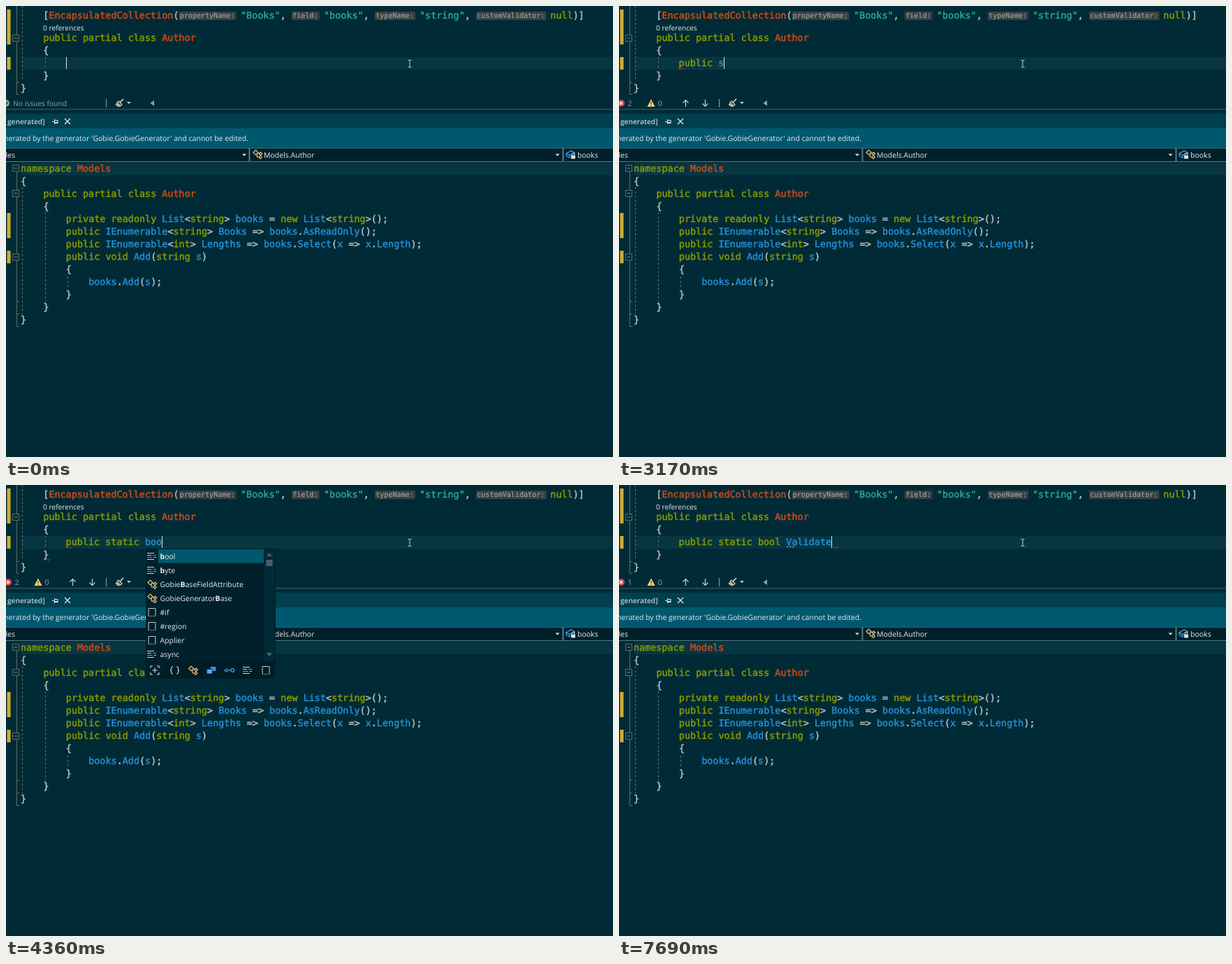
Recreate the animation shown at these times as an HTML page. Size 869 px wide and 645 px high, loop 8 s.

```html
<!DOCTYPE html>
<html lang="en">
<head>
<meta charset="utf-8">
<title>Code editor</title>
<style>
html, body { margin: 0; width: 100%; height: 100%; overflow: hidden; background: #002b36; }
svg { display: block; }
text { white-space: pre; text-rendering: geometricPrecision; }
.code { font: 13.45px "DejaVu Sans Mono", monospace; stroke-width: .5px; }
.code tspan { fill: currentColor; stroke: currentColor; }
.hint { font: 10.1px "DejaVu Sans Mono", monospace; fill: #99a09b; stroke: #99a09b; stroke-width: .2px; }
.ui { font: 10.5px "Open Sans", "Noto Sans", sans-serif; fill: #e6eced; }
.small { font-size: 10.2px; }
.muted { fill: #93a1a1; }
.tab { font-size: 10.2px; font-weight: 600; fill: #c3d0d2; }
.bold { font-weight: 700; }
</style>
</head>
<body>
<svg width="869" height="645" viewBox="0 0 869 645">
  <g id="base"></g>
  <g id="live"></g>
</svg>
<script>
const CH = 8.1, LEFT = 85.6, ROW = 81, LOOP = 8000;
const GREEN = '#859900', BLUE = '#268bd2', ORANGE = '#cb4b16', TEAL = '#2aa198', GREY = '#b3bec0';
const KEYWORDS = /^(namespace|public|private|partial|class|readonly|new|void|static|bool|string|int|null)$/;
const NAMES = /^(Author|Models|EncapsulatedCollection)$/;

const esc = s => s.replace(/&/g, '&amp;').replace(/</g, '&lt;').replace(/>/g, '&gt;');
const rect = (x, y, w, h, fill, extra = '') =>
  `<rect x="${x}" y="${y}" width="${w}" height="${h}" fill="${fill}" ${extra}/>`;
const path = (d, stroke, w = 1, extra = '') =>
  `<path d="${d}" fill="none" stroke="${stroke}" stroke-width="${w}" ${extra}/>`;
const shape = (d, fill) => `<path d="${d}" fill="${fill}"/>`;
const at = (x, y, body) => `<g transform="translate(${x} ${y})">${body}</g>`;
const ui = (x, y, s, cls = '', anchor = 'start') =>
  `<text class="ui ${cls}" x="${x}" y="${y + 3.6}" text-anchor="${anchor}">${esc(s)}</text>`;

function tint(word) {
  if (word[0] === '"') return TEAL;
  if (KEYWORDS.test(word)) return GREEN;
  if (NAMES.test(word)) return ORANGE;
  return /\w/.test(word) ? BLUE : GREY;
}

// One line of code, coloured by token, centred on y.
function code(x, y, line) {
  const spans = line.match(/"[^"]*"|\w+|[^\w"]+/g) || [];
  return `<text class="code" x="${x}" y="${y + 5}">` +
    spans.map(s => `<tspan style="color:${tint(s)}">${esc(s)}</tspan>`).join('') + '</text>';
}

const hint = (x, w, s) => rect(x, 8, w, 12, '#39413f', 'rx="1"') +
  `<text class="hint" x="${x + 1.2}" y="17.4">${s}</text>`;
const guide = (x, y1, y2) => path(`M${x + .5} ${y1}V${y2}`, '#5f706d', 1, 'stroke-dasharray="3 3"');
const fold = y => rect(9.5, y - 4.5, 9, 9, '#002b36', 'stroke="#5d6b68"') + path(`M11.5 ${y}h5`, '#7c8a88');
const mark = (y, h) => rect(1.5, y, 5, h, '#cfae33');
const squiggle = (x, y) => path(`M${x} ${y}l2 2l2.5 -2l2.5 2l2 -2`, '#c03c37', .9);
const band = y => rect(22, y, 847, 18, '#073642');
const arrowDown = (x, y, fill = '#d5dfe0') => shape(`M${x - 3} ${y - 1.5}h6l-3 3.2z`, fill);

// Icons are drawn around their own centre.
const icons = {
  keyword: c => path('M-7 -4.5H3M-7 4.5H3M-7 -1.5H-1M3 1.5H6', c || '#d2dadb') +
    path('M1 -1.5H6M-7 1.5H1', c || '#4aa3f0'),
  type: c => path('M-6 -2.5L-2.5 -6L1 -2.5L-2.5 1zM0 -1.5H4.5M-.5 0V4H2M4.5 -3l2.2 2.2l-2.2 2.2l-2.2 -2.2zM4 2l2.2 2.2l-2.2 2.2l-2.2 -2.2z', c || '#e8c27a', 1.2),
  snippet: c => path('M-5 5V-5.5H5V5', c || '#c3cccd') +
    path('M-5 5.5H5', c || '#c3cccd', 1, 'stroke-dasharray="1.5 1.5"'),
  expand: () => path('M-6 -3V-6H-3M3 -6H6V-3M6 3V6H3M-3 6H-6V3M0 -3.5V3.5M-3.5 0H3.5', '#d8dfe0', 1.1),
  braces: c => path('M-2.5 -5h-1q-1.3 0 -1.3 1.6v1.8l-1.2 1.6l1.2 1.6v1.8q0 1.6 1.3 1.6h1M2.5 -5h1q1.3 0 1.3 1.6v1.8l1.2 1.6l-1.2 1.6v1.8q0 1.6 -1.3 1.6h-1', c || '#d8dfe0', 1.1),
  blocks: c => rect(-1, -5, 7.5, 6, c || '#3794ee') + rect(-6.5, -1.5, 8, 6.5, c || '#58aaf5', 'stroke="#00212b" stroke-width=".7"'),
  link: c => path('M-2.5 0H2', c || '#4aa3f0', 1.2) +
    `<g fill="none" stroke="${c || '#4aa3f0'}" stroke-width="1.2"><circle cx="-4.5" r="2"/><circle cx="4.3" r="2.4"/></g>`
};
const icon = (name, x, y, c) => at(x, y, icons[name](c));

function chrome() {
  const lines = ['namespace Models', '{', '    public partial class Author', '    {',
    '        private readonly List<string> books = new List<string>();',
    '        public IEnumerable<string> Books => books.AsReadOnly();',
    '        public IEnumerable<int> Lengths => books.Select(x => x.Length);',
    '        public void Add(string s)', '        {', '            books.Add(s);',
    '        }', '    }', '}'];
  const outline = 'M15.5 0V126.5H19M15.5 109.5H19M15.5 237V458.5H19M15.5 422.5H19M15.5 440.5H19';
  return rect(0, 0, 869, 645, '#002b36') + band(73) +
    // upper editor
    path(outline, '#5d6b68') + fold(46) +
    guide(23, 0, 108) + guide(56, 73, 91) +
    mark(5, 50) + mark(73, 18) +
    code(53.3, 13, '[EncapsulatedCollection(') +
    hint(247.5, 82, 'propertyName:') + code(336, 13, '"Books",') +
    hint(409, 39.5, 'field:') + code(455, 13, '"books",') +
    hint(528, 58, 'typeName:') + code(592, 13, '"string",') +
    hint(673, 100.5, 'customValidator:') + code(779.3, 13, 'null)]') +
    ui(53, 31, '0 references', 'small') +
    code(53.3, 45, 'public partial class Author') +
    code(53.3, 63, '{') + code(53.3, 99, '}') + code(21, 117, '}') +
    path('M575.5 77.5h1.8l.7 .7l.7 -.7h1.8M578 78V87M575.5 87.5h1.8l.7 -.7l.7 .7h1.8', '#c9d2d3') +
    // status strip
    path('M143.5 133V145', '#93a1a1') +
    at(162, 139, path('M6 -6L1 -1', '#d5dfe0', 1.6) + path('M-1 -3L4 2L2 4L-3 -1z', '#d5dfe0', 1.1) +
      shape('M-3.5 -.5L1.5 4.5L-1 5.5L-5.5 2z', '#d9bd82')) +
    arrowDown(176, 138.5, '#b9c6c8') + shape('M212 135V143L206.5 139z', '#93a1a1') +
    // lower tab, notice and navigation
    rect(0, 147, 869, 1.5, '#27525c') + rect(0, 154, 869, 21, '#003f4f') +
    ui(55.5, 165, 'generated]', 'tab', 'end') +
    path('M66 165.5H69M69.5 162V169M70 163.5H74V167.5H70M70 166.5H74', '#d5dfe0', 1.1) +
    path('M84 161L92 169M92 161L84 169', '#e2e9ea', 1.3) +
    rect(0, 175, 869, 28, '#00586e') +
    ui(347, 189, "nerated by the generator 'Gobie.GobieGenerator' and cannot be edited.", '', 'end') +
    rect(0, 203, 869, 20, '#00212b') +
    path('M0 203.5H869', '#2f6570') + path('M0 222.5H869', '#547f83') +
    path('M348.5 203V223M797.5 203V223', '#547f83', 2) +
    ui(13, 213, 'les', '', 'end') + arrowDown(341, 213) +
    icon('type', 360, 212) + ui(369, 213, 'Models.Author') + arrowDown(789.5, 213) +
    at(808, 212, path('M-6 -1L1 -5L6 -2.5L-1 1.5zM-6 -1V2.5L-1 5V1.5M6 -2.5V0', '#4aa3f0', 1.2) +
      rect(1, 1.5, 6, 5, '#d8dfe0') + path('M2.3 1.5V0a1.7 1.7 0 0 1 3.4 0V1.5', '#d8dfe0')) +
    ui(818, 213, 'books') +
    // lower editor
    band(224) + fold(232) + fold(268) + fold(359) +
    guide(23, 259, 441) + guide(56, 295, 423) + guide(88, 387, 405) +
    mark(296, 36) + mark(350, 18) +
    lines.map((s, i) => {
      const pad = s.search(/\S/);
      return code(21 + pad * CH, 232 + i * 18, s.slice(pad));
    }).join('');
}

function status(errors) {
  if (!errors) {
    return `<circle cx="0" cy="139" r="5" fill="#93a1a1"/>` + path('M-2.5 139L-.5 141L3 137', '#002b36', 1.2) +
      ui(10.3, 139, 'No issues found', 'small muted');
  }
  return `<circle cx="3" cy="139" r="5" fill="#e0444c"/>` + path('M1 137l4 4m0 -4l-4 4', '#fff', 1.1) +
    ui(15.5, 139, '' + errors, 'muted', 'middle') +
    shape('M46 133.5L51.5 144H40.5z', '#f3d27c') + path('M46 137V140.5M46 141.5V143', '#3a3420', 1.2) +
    ui(58.5, 139, '0', 'muted', 'middle') +
    path('M95.5 144V134.5M91.5 138.5L95.5 134.5L99.5 138.5', '#c6d1d3', 1.2) +
    path('M123.5 134V143.5M119.5 139.5L123.5 143.5L127.5 139.5', '#c6d1d3', 1.2);
}

function label(x, y, name, key) {
  const i = key.length === 1 ? name.search(new RegExp(key.toUpperCase() + '|^' + key)) : name.indexOf(key);
  const cut = i < 0 ? name.length : i;
  return `<text class="ui" x="${x}" y="${y + 3.6}">${esc(name.slice(0, cut))}` +
    `<tspan class="bold">${name.slice(cut, cut + key.length)}</tspan>${name.slice(cut + key.length)}</text>`;
}

const kind = s => /^Gobie/.test(s) ? 'type' : /^(#|Applier)/.test(s) ? 'snippet' : 'keyword';

function popup({ col, key, items }) {
  const x = Math.round(LEFT + col * CH) + 1, n = items.length, long = n > 1;
  const w = long ? 186 : 199, foot = 92 + n * 20;
  const dim = long ? '' : '#35515a';
  let out = rect(x, 91, w, n * 20 + 26, '#00212b') +
    rect(x + 18, 92, long ? 151 : 180, 19.5, '#00586e') +
    rect(x + 27, foot + 1, w - 28, 24, '#001d26');
  items.forEach((s, i) => {
    const y = 102 + i * 20;
    out += icon(kind(s), x + 9, y) + label(x + 20.5, y, s, key);
  });
  if (long) {
    out += rect(x + 170, 92, 14, n * 20, '#002b36') + rect(x + 172.5, 107, 9, 9, '#45636b') +
      shape(`M${x + 173} 102h8l-4 -5z`, '#45636b') + shape(`M${x + 173} 240h8l-4 5z`, '#45636b');
  }
  const y = foot + 13;
  ['expand', 'braces', 'type', 'blocks', 'link', 'keyword', 'snippet'].forEach((name, i) => {
    out += icon(name, x + (i ? 15.5 + i * 26.1 : 13), y, name === 'keyword' ? '' : dim);
  });
  return out;
}

const menu = (col, key, list) => ({ col, key, items: list.split(' ') });
const P_LIST = menu(0, 'p', 'partial private protected public #pragma #if Applier async');
const S_LIST = menu(7, 's', 'static sbyte sealed short string struct #region async');
const B_LIST = menu(14, 'b', 'bool byte GobieBaseFieldAttribute GobieGeneratorBase #if #region Applier async');

// Each step changes part of the state from its time on.
const steps = [
  [0, { text: '', caret: 1, menu: null, errors: 0, start: 0, brace: 0, tail: 0 }],
  [350, { caret: 0 }], [830, { caret: 1 }], [1360, { caret: 0 }], [1960, { caret: 1 }],
  [2290, { text: 'p' }], [2430, { menu: P_LIST }], [2500, { text: 'pu' }], [2570, { text: 'pub' }],
  [2640, { menu: menu(0, 'pub', 'public') }], [2700, { text: 'publ' }], [2770, { text: 'publi' }],
  [2840, { text: 'public' }], [2920, { text: 'public ', menu: null }],
  [3050, { errors: 2, start: 1 }],
  [3170, { text: 'public s' }], [3250, { menu: S_LIST }], [3320, { text: 'public st' }],
  [3400, { text: 'public sta' }], [3490, { text: 'public stat' }],
  [3570, { menu: menu(7, 'stat', 'static') }], [3630, { text: 'public stati' }],
  [3770, { text: 'public static' }], [3850, { text: 'public static ', menu: null }],
  [3930, { brace: 1 }], [4030, { text: 'public static b' }], [4130, { text: 'public static bo' }],
  [4230, { text: 'public static boo' }], [4360, { menu: B_LIST }],
  [4550, { menu: menu(14, 'boo', 'bool') }],
  [4910, { text: 'public static bool' }], [5040, { text: 'public static bool ', menu: null }],
  [5510, { caret: 0 }], [5830, { start: 0 }], [5900, { errors: 1 }], [6090, { caret: 1 }],
  [6640, { text: 'public static bool V' }], [6760, { text: 'public static bool Va' }],
  [6880, { text: 'public static bool Val' }], [7000, { brace: 0, tail: 1 }],
  [7120, { text: 'public static bool Vali' }], [7350, { text: 'public static bool Valid' }],
  [7500, { text: 'public static bool Valida' }], [7600, { text: 'public static bool Validat' }],
  [7690, { text: 'public static bool Validate' }]
];

function draw(s) {
  const end = LEFT + s.text.length * CH;
  let out = status(s.errors) + code(LEFT, ROW, s.text);
  if (s.start) out += squiggle(85, 88.5);
  if (s.brace) out += squiggle(54, 106);
  if (s.tail) {
    out += squiggle(end + 1, 88.5);
    for (let i = 0; i < 3; i++) out += rect(240.5 + i * 4, 87.5, 2, 1.6, '#b3bec0');
  }
  if (s.caret) out += rect(Math.round(end), 73, 1, 17, '#dfe5e6');
  if (s.menu) out += popup(s.menu);
  return out;
}

document.getElementById('base').innerHTML = chrome();
const live = document.getElementById('live');
const begin = performance.now();
let shown = 0;

function tick(now) {
  const t = Math.max(0, now - begin) % LOOP;
  const count = steps.filter(([time]) => time <= t).length;
  if (count !== shown) {
    shown = count;
    live.innerHTML = draw(Object.assign({}, ...steps.slice(0, count).map(step => step[1])));
  }
  requestAnimationFrame(tick);
}
tick(begin);
</script>
</body>
</html>
```
